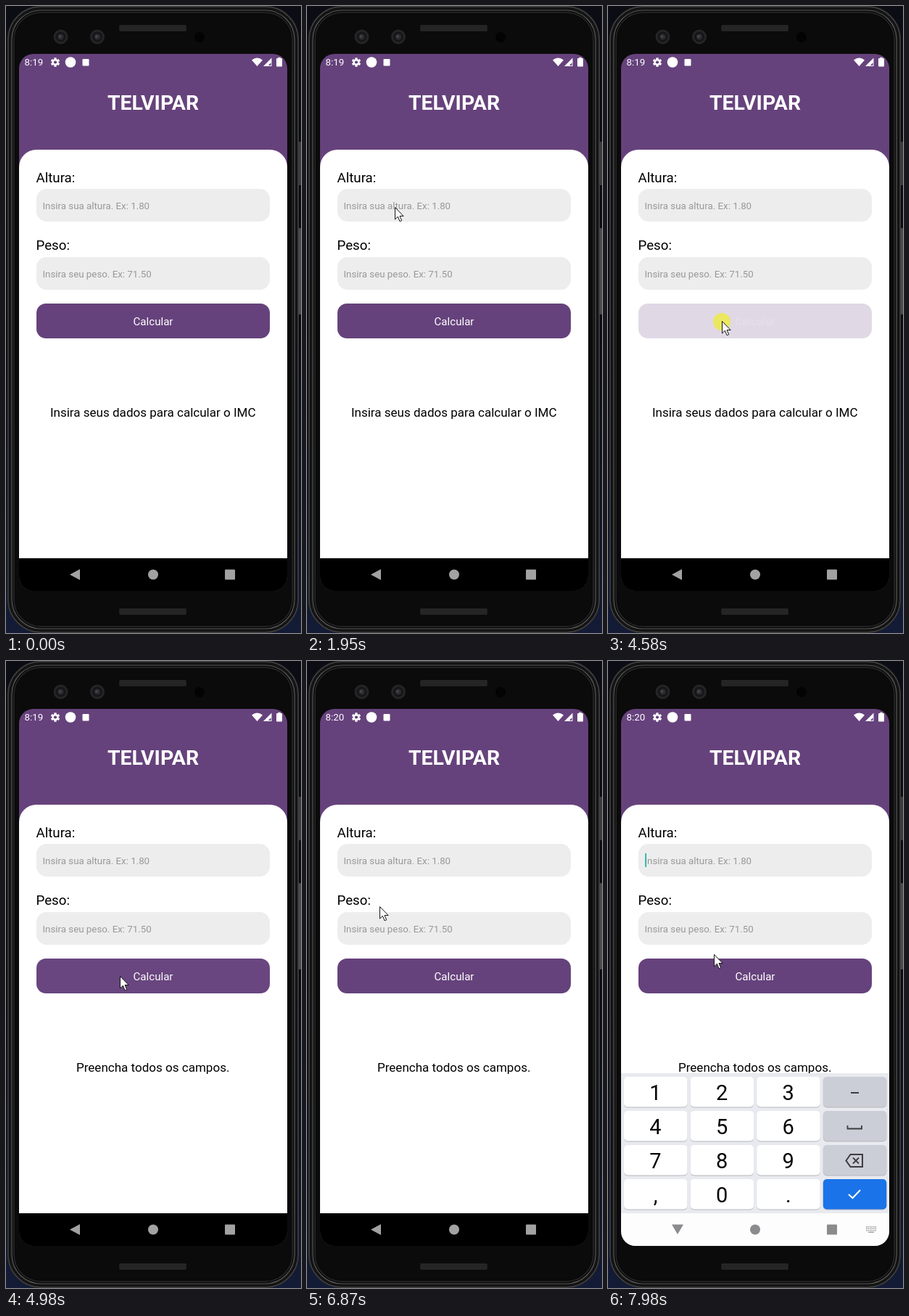
These frames come from a looping animation (407 px wide and 864 px high, 8 s). An HTML page with a canvas:

```html
<!DOCTYPE html>
<html lang="pt-BR">
<head>
<meta charset="utf-8">
<style>
  html, body { margin: 0; width: 100%; height: 100%; overflow: hidden; background: #0b0e1a; }
  canvas { display: block; width: 407px; height: 864px; }
</style>
</head>
<body>
<canvas id="stage"></canvas>
<script>
const W = 407, H = 864, LOOP = 8000, STEP = 70;
const PURPLE = '#66427c';
const canvas = document.getElementById('stage');
const ctx = canvas.getContext('2d');
const ratio = window.devicePixelRatio || 1;
canvas.width = W * ratio;
canvas.height = H * ratio;

const SPANS = [[260, 1040], [1110, 1880], [1950, 2720], [2790, 3550], [3620, 4180],
  [4510, 4980], [5190, 5960], [6040, 6800], [6870, 7630], [7700, 7980]];

// Pointer path: [time, x, y]
const PATH = [
  [260, 328, 838], [600, 255, 730], [1040, 158, 612], [1110, 148, 588],
  [1400, 80, 435], [1630, 64, 262], [1880, 110, 275], [1950, 121, 277],
  [2160, 108, 275], [2370, 71, 284], [2600, 76, 386], [2720, 66, 381],
  [2860, 49, 373], [3000, 80, 370], [3140, 112, 372], [3350, 149, 377],
  [3550, 112, 374], [3690, 93, 372], [3900, 130, 405], [4180, 157, 434],
  [5120, 157, 434], [5400, 176, 545], [5650, 140, 566], [5960, 224, 569],
  [6040, 226, 571], [6300, 196, 520], [6600, 128, 420], [6800, 101, 361],
  [6870, 100, 338], [7150, 112, 279], [7630, 114, 278], [7770, 124, 318],
  [7980, 146, 404]
];

const clamp = v => Math.max(0, Math.min(1, v));
const mix = (a, b, k) => a + (b - a) * k;
const easeInOut = k => k < 0.5 ? 2 * k * k : 1 - 2 * (1 - k) * (1 - k);
const easeOut = k => 1 - (1 - k) ** 3;

function sampled(t) {
  let q = 0;
  for (const [start, end] of SPANS) {
    if (t >= start) q = Math.min(end, start + Math.floor((t - start) / STEP) * STEP);
  }
  return q;
}

function pointerAt(t) {
  if (t < PATH[0][0]) return null;
  for (let i = 1; i < PATH.length; i++) {
    const a = PATH[i - 1], b = PATH[i];
    if (t <= b[0]) {
      const k = (t - a[0]) / (b[0] - a[0]);
      return [mix(a[1], b[1], k), mix(a[2], b[2], k)];
    }
  }
  return PATH[PATH.length - 1].slice(1);
}

function buttonAlpha(t) {
  if (t < 4580) return mix(1, 0.2, easeInOut(clamp((t - 4430) / 150)));
  return mix(0.2, 1, easeInOut(clamp((t - 4710) / 250)));
}

function box(x, y, w, h, r, fill) {
  ctx.beginPath();
  ctx.roundRect(x, y, w, h, r);
  ctx.fillStyle = fill;
  ctx.fill();
}

function ring(inset, r, width, color) {
  ctx.beginPath();
  ctx.roundRect(2 + inset, inset, 402 - 2 * inset, 864 - 2 * inset, r);
  ctx.lineWidth = width;
  ctx.strokeStyle = color;
  ctx.stroke();
}

function dot(x, y, r, fill) {
  ctx.beginPath();
  ctx.arc(x, y, r, 0, Math.PI * 2);
  ctx.fillStyle = fill;
  ctx.fill();
}

function poly(points, fill) {
  ctx.beginPath();
  points.forEach(([x, y]) => ctx.lineTo(x, y));
  ctx.closePath();
  ctx.fillStyle = fill;
  ctx.fill();
}

function line(points, color, width) {
  ctx.beginPath();
  points.forEach(([x, y]) => ctx.lineTo(x, y));
  ctx.strokeStyle = color;
  ctx.lineWidth = width;
  ctx.stroke();
}

function text(str, x, y, size, color, align = 'left', weight = 400) {
  ctx.font = `${weight} ${size}px Roboto, sans-serif`;
  ctx.textAlign = align;
  ctx.fillStyle = color;
  ctx.fillText(str, x, y);
}

function grill(y) {
  box(156, y, 93, 9, 2, '#202020');
  ctx.fillStyle = '#343434';
  for (let row = 0; row < 4; row++) {
    for (let x = 157 + row % 2; x < 248; x += 2) ctx.fillRect(x, y + 1 + row * 2, 1, 1);
  }
}

function camera(x) {
  dot(x, 42.5, 10, '#252527');
  dot(x, 42.5, 7, '#161618');
  dot(x, 42.5, 4, '#2b2c30');
  dot(x - 1, 42, 1.8, '#47484d');
}

function phone() {
  const bg = ctx.createLinearGradient(0, 0, 0, H);
  bg.addColorStop(0, '#0c0d14');
  bg.addColorStop(0.5, '#090b14');
  bg.addColorStop(1, '#131b36');
  ctx.fillStyle = bg;
  ctx.fillRect(0, 0, W, H);
  box(402, 187, 5, 60, 1, '#3c3c3e');
  box(402, 306, 5, 119, 1, '#4b4b4d');
  box(2, 0, 402, 864, 46, '#080808');
  ring(1, 45, 2, '#3b3b3b');
  ring(4, 42, 2, '#181818');
  ring(6, 40, 1.2, '#5d5d5d');
  ring(9, 37, 2, '#222222');
  box(13, 11, 380, 842, 35, '#0b0b0b');
  grill(26);
  grill(830);
  camera(75.5);
  camera(126);
  dot(267, 43, 7, '#030303');
}

function gear(x, y) {
  ctx.save();
  ctx.translate(x, y);
  ctx.fillStyle = '#fff';
  for (let i = 0; i < 6; i++) {
    ctx.fillRect(-1.6, -6.2, 3.2, 4);
    ctx.rotate(Math.PI / 3);
  }
  dot(0, 0, 4.6, '#fff');
  dot(0, 0, 2.1, PURPLE);
  ctx.restore();
}

function statusBar(clock) {
  text(clock, 25.5, 82, 13.3, '#fff');
  gear(68, 77.5);
  dot(89, 77.5, 7.3, '#fff');
  box(105.5, 73, 9, 9.5, 1, '#fff');
  ctx.beginPath();
  ctx.moveTo(346.5, 83);
  ctx.lineTo(339, 74.5);
  ctx.quadraticCurveTo(346.5, 68.5, 354, 74.5);
  ctx.closePath();
  ctx.fillStyle = '#fff';
  ctx.fill();
  poly([[355, 83], [366.5, 83], [366.5, 71.5]], '#fff');
  poly([[362, 82], [365.5, 82], [365.5, 78]], PURPLE);
  box(373, 72, 8, 11.5, 1, '#fff');
  ctx.fillRect(375.3, 70.8, 3.4, 2);
}

function form(t) {
  text('Altura:', 41.5, 242.5, 18.7, '#000');
  box(42, 252, 322, 45, 14, '#ededed');
  text('Insira sua altura. Ex: 1.80', 50.5, 280, 13.3, '#989898');
  text('Peso:', 41.5, 336, 18.7, '#000');
  box(42, 346, 322, 45, 14, '#ededed');
  text('Insira seu peso. Ex: 71.50', 50.5, 374, 13.3, '#989898');
  ctx.globalAlpha = buttonAlpha(t);
  box(42, 410, 322, 48, 13, PURPLE);
  text('Calcular', 203, 440, 15.1, '#fff', 'center');
  ctx.globalAlpha = 1;
  const message = t < 4715 ? 'Insira seus dados para calcular o IMC' : 'Preencha todos os campos.';
  text(message, 202.7, 565.5, 17.05, '#000', 'center');
  if (t >= 7300) box(51.3, 265, 1.7, 19, 0, '#16b3a2');
}

function navBar(open) {
  ctx.fillStyle = open ? '#fdfdfe' : '#000';
  ctx.fillRect(18, 761, 370, 45);
  const grey = open ? '#8b8b8d' : '#a2a2a2';
  if (open) poly([[88, 776.5], [104, 776.5], [96, 790]], grey);
  else poly([[88, 783.5], [102, 776], [102, 791]], grey);
  dot(203, 783.5, 7, grey);
  box(302, 776.5, 14, 14, 1, grey);
  if (!open) return;
  ctx.fillStyle = '#9a9a9c';
  for (let row = 0; row < 3; row++) {
    for (let i = 0; i < 6; i++) ctx.fillRect(356 + i * 2.5, 779 + row * 2.5, 1.5, 1.5);
  }
  ctx.fillRect(359, 786.5, 8, 1.3);
}

function keyIcon(row, y) {
  const ink = '#3b3d42';
  if (row === 0) line([[335, y + 1], [346, y + 1]], ink, 2);
  if (row === 1) line([[330.5, y - 1], [330.5, y + 3.5], [350, y + 3.5], [350, y - 1]], ink, 1.8);
  if (row === 2) {
    line([[328.5, y + .5], [334.5, y - 8], [351, y - 8], [351, y + 9], [334.5, y + 9], [328.5, y + .5], [329, y]], ink, 2);
    line([[338, y - 3.5], [346, y + 4.5]], ink, 1.8);
    line([[346, y - 3.5], [338, y + 4.5]], ink, 1.8);
  }
  if (row === 3) line([[332, y], [337.5, y + 5], [348, y - 6]], '#fff', 2);
}

function keyboard(t) {
  const k = easeOut(clamp((t - 7400) / 350));
  if (k <= 0) return;
  ctx.save();
  ctx.beginPath();
  ctx.rect(18, 566, 370, 195);
  ctx.clip();
  ctx.translate(0, 193 * (1 - k));
  ctx.fillStyle = '#e8eaef';
  ctx.fillRect(18, 568, 370, 193);
  ['123', '456', '789', ',0.'].forEach((keys, row) => {
    const top = 573 + row * 47;
    for (let col = 0; col < 4; col++) {
      const x = 22 + col * 91.6;
      const fill = col < 3 ? '#fff' : row < 3 ? '#cbced6' : '#1a73e8';
      box(x, top + 1, 87.5, 41.5, 5, '#b5b8be');
      box(x, top, 87.5, 41.5, 5, fill);
      if (col < 3) text(keys[col], x + 43.5, top + 32, 29, '#050505', 'center');
    }
    keyIcon(row, top + 21);
  });
  ctx.restore();
}

function pointer(t) {
  const p = pointerAt(t);
  if (!p) return;
  const pressed = (t >= 4510 && t < 4720) || (t >= 7150 && t < 7360);
  if (pressed) dot(p[0], p[1] + 1, 12, '#ebe760');
  ctx.save();
  ctx.translate(p[0] + 0.5, p[1] + 0.5);
  poly([[0, 0], [0, 16.5], [3.9, 12.8], [6.6, 19.3], [9.2, 18.2], [6.5, 12], [11.6, 12]], '#fff');
  ctx.lineWidth = 1;
  ctx.strokeStyle = '#151515';
  ctx.stroke();
  ctx.restore();
}

function draw(t) {
  ctx.setTransform(ratio, 0, 0, ratio, 0, 0);
  phone();
  ctx.save();
  ctx.beginPath();
  ctx.roundRect(18, 66, 370, 740, 20);
  ctx.clip();
  ctx.fillStyle = PURPLE;
  ctx.fillRect(18, 66, 370, 740);
  statusBar(t < 5600 ? '8:19' : '8:20');
  text('TELVIPAR', 203, 143, 28.4, '#fff', 'center', 700);
  box(18, 198, 370, 563, [24, 24, 0, 0], '#fff');
  form(t);
  keyboard(t);
  navBar(t >= 7400);
  ctx.restore();
  pointer(t);
}

function tick() {
  draw(sampled(performance.now() % LOOP));
  requestAnimationFrame(tick);
}
tick();
</script>
</body>
</html>
```
